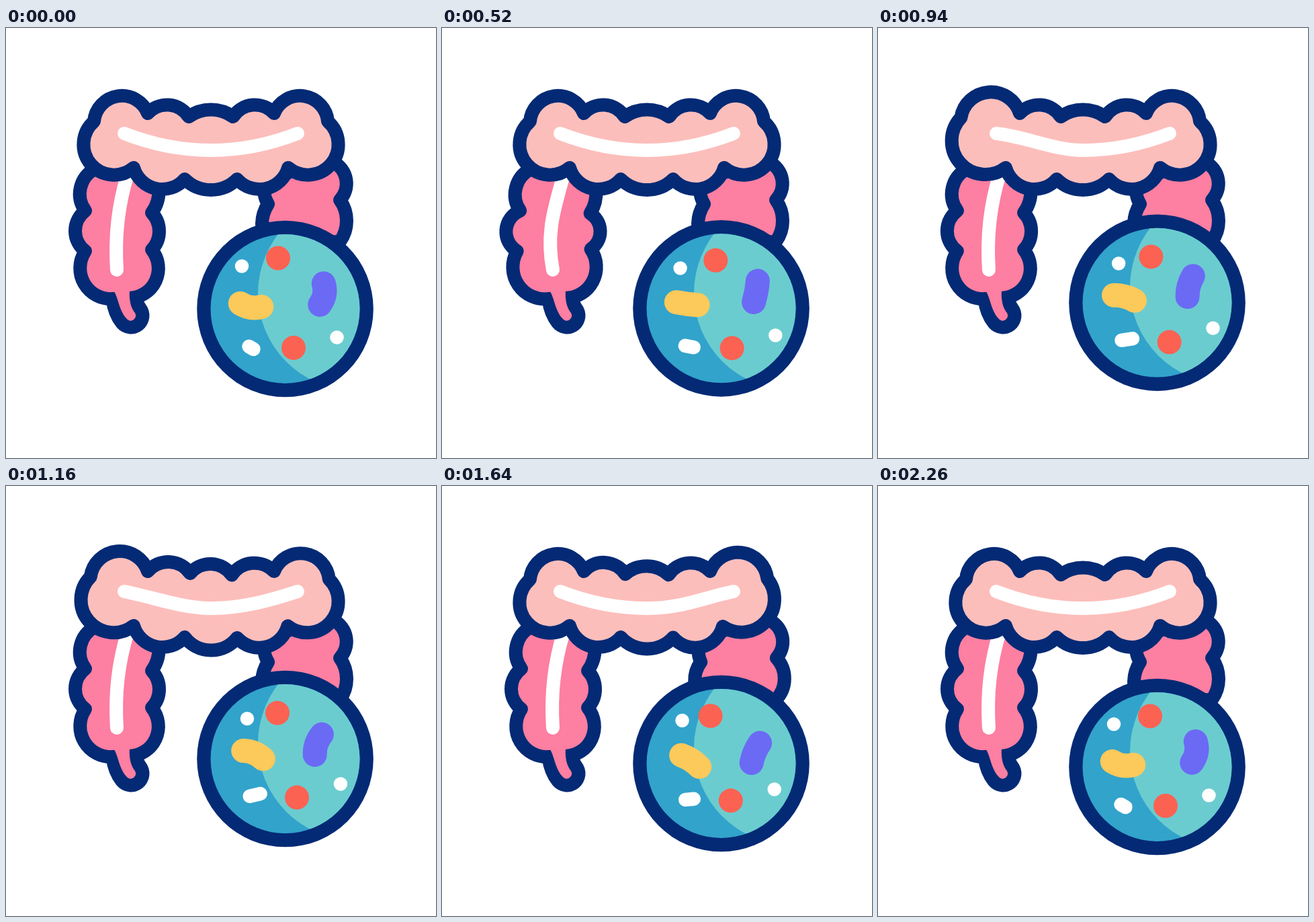
Write an HTML page with a canvas that moves like this. It is 640x640 px and loops after 2.4 s.

```html
<!DOCTYPE html>
<html>
<head>
<meta charset="utf-8">
<style>
html, body { margin: 0; width: 100%; height: 100%; overflow: hidden; background: #fff; }
canvas { display: block; width: 640px; height: 640px; }
</style>
</head>
<body>
<canvas width="640" height="640"></canvas>
<script>
const ctx = document.querySelector('canvas').getContext('2d');
const LOOP = 2400, START = 220, END = 2260;
const NAVY = '#042a75', PINK = '#fd7fa1', BLUSH = '#fcbebb', WHITE = '#fff';
const RED = '#fc6252', PURPLE = '#6b6af5', YELLOW = '#fcc95b';

// Raised cosine: 0 to 1 to 0 around the peak time.
function swell(t, peak, half) {
  const d = Math.abs(t - peak) / half;
  return d < 1 ? (1 + Math.cos(Math.PI * d)) / 2 : 0;
}

// Closed outline of arcs; each point is [x, y, height of the arc leading to it].
function lobes(points) {
  let [px, py] = points[0], d = `M${px} ${py}`;
  for (const [x, y, h] of points.slice(1)) {
    const c = Math.hypot(x - px, y - py) / 2;
    const r = h ? (c * c + h * h) / (2 * h) : 0;
    d += `A${r} ${r} 0 ${h > c ? 1 : 0} 1 ${x} ${y}`;
    px = x; py = y;
  }
  return d + 'Z';
}

function fill(d, color) {
  ctx.fillStyle = color;
  ctx.fill(new Path2D(d));
}

function stroke(d, color, width) {
  ctx.strokeStyle = color;
  ctx.lineWidth = width;
  ctx.stroke(new Path2D(d));
}

function outlined(d, color) {
  fill(d, color);
  stroke(d, NAVY, 20);
}

function disc(x, y, r, color) {
  ctx.fillStyle = color;
  ctx.beginPath();
  ctx.arc(x, y, r, 0, 7);
  ctx.fill();
}

function leftColumn(t) {
  const w = swell(t, 600, 370);
  stroke('M176 402Q178 418 186 428', NAVY, 55);
  outlined(lobes([
    [132, 210], [215, 208, 0],
    [217 + 4 * w, 275 + w, 11.5], [217 + 5 * w, 330 - w, 11 + 4 * w],
    [183, 402, 25], [160, 403, 0],
    [118 - 7 * w, 332, 26 + w], [118 - 2 * w, 272, 15 + 4 * w], [132, 210, 14.5]
  ]), PINK);
  fill('M160 391C167 400 168 420 179 432A7.5 7.5 0 0 0 192 424C186 417 183 405 184 391Z', PINK);
  stroke(`M181 218C${167 + 3 * w} 263 ${161.7 - 9 * w} ${310 - 10 * w} 165 360`, WHITE, 20);
}

function rightColumn(t) {
  const w = swell(t, 1760, 400);
  outlined(lobes([
    [388, 222], [488, 200, 0],
    [497 + w, 256, 14], [497, 318, 10 + 3 * w],
    [388, 320, 0], [390 - 6 * w, 262, 8 + 3 * w], [388, 222, 5]
  ]), PINK);
}

function crossPart(t) {
  const a = swell(t, 1000, 400), b = swell(t, 1360, 400), c = swell(t, 1450, 400);
  const joint = [131 - 8 * a, 139 - 6 * a];
  outlined(lobes([
    joint,
    [211, 127, 32 + 3 * a], [272 + 4 * b, 132 - 4 * b, 15 + b],
    [338 - 4 * b, 132 + b, 10.5 + 9.5 * b], [399, 127, 15],
    [479 + 10 * c, 139 - 2 * c, 32 + 3 * c], [420 - 4 * c, 208 + 2 * c, 45 - 6 * c],
    [344, 225 + 2 * b, 23], [266, 225, 16 + 6 * b], [190, 208, 23],
    [...joint, 45 + a]
  ]), BLUSH);
  stroke(`M176 157C219 ${173.7 - 13 * a} 262 182 305 182
    C${348 + 14 * c} ${182 + c} 391 ${173.7 - 15 * c} 434 157`, WHITE, 20);
}

// Pose is x, y, angle, bend, half length. Out is added on a half wave, sway on a full wave.
const microbes = [
  { color: WHITE, width: 20.5, pose: [351, 354.5], out: [8, 3], sway: [0, 3] },
  { color: RED, width: 36, pose: [405, 342.5], out: [-2, 7], sway: [4, 1] },
  { color: RED, width: 36, pose: [428, 476], out: [4.5, -1], sway: [2, 2] },
  { color: WHITE, width: 20.5, pose: [492.5, 460.5], out: [5, -5], sway: [2, 0] },
  { color: PURPLE, width: 36, pose: [470, 396, 100, -8, 16], out: [-5, 2, 10, 14], sway: [-1, -5, -5] },
  { color: YELLOW, width: 36, pose: [364.5, 412.5, 9, 7, 16], out: [4, 0, 16, -13], sway: [-2, -2, -11] },
  { color: WHITE, width: 20.5, pose: [365, 476, 30, 0, 4], out: [5.5, -4.5, -43, 0, 4], sway: [1, 1, 0, 0, 1] }
];

function microbe({ color, width, pose, out, sway }, t) {
  const phase = Math.PI * Math.min(1, Math.max(0, (t - START) / (END - START)));
  const half = Math.sin(phase), full = Math.sin(2 * phase);
  const [x, y, angle, bend, reach] = pose.map((v, i) => v + half * (out[i] || 0) + full * (sway[i] || 0));
  if (!reach) return disc(x, y, width / 2, color);
  ctx.save();
  ctx.translate(x, y);
  ctx.rotate(angle * Math.PI / 180);
  stroke(`M${-reach} 0Q0 ${bend} ${reach} 0`, color, width);
  ctx.restore();
}

function lens(t) {
  const x = 415.5, y = 418;
  ctx.save();
  ctx.translate(0, -12 * swell(t, 1200, 800));
  disc(x, y, 131.3, NAVY);
  disc(x, y, 111, '#32a3cb');
  ctx.save();
  ctx.beginPath();
  ctx.arc(x, y, 111, 0, 7);
  ctx.clip();
  disc(519, 395, 144, '#6bcccf');
  ctx.restore();
  microbes.forEach(m => microbe(m, t));
  ctx.restore();
}

function draw() {
  const t = performance.now() % LOOP;
  ctx.fillStyle = WHITE;
  ctx.fillRect(0, 0, 640, 640);
  ctx.lineCap = ctx.lineJoin = 'round';
  leftColumn(t);
  rightColumn(t);
  crossPart(t);
  lens(t);
  requestAnimationFrame(draw);
}
draw();
</script>
</body>
</html>
```
